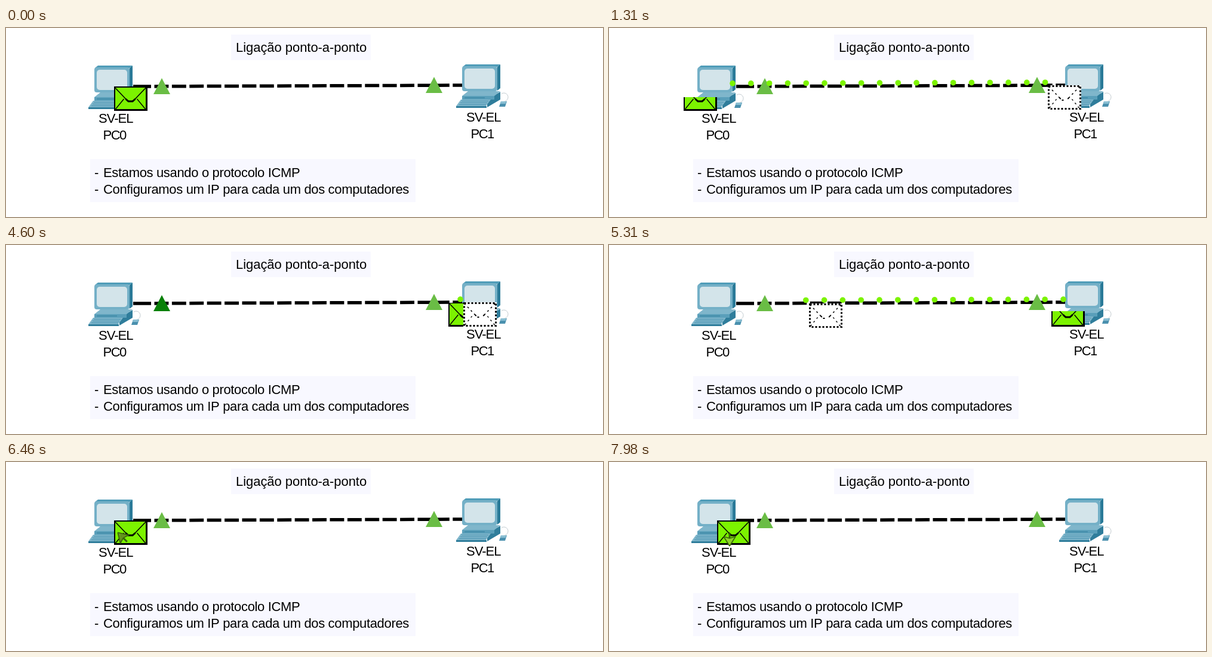
These frames come from a looping animation (1000 px wide and 317 px high, 8 s). An HTML page with a canvas:

```html
<!DOCTYPE html>
<html lang="pt">
<head>
<meta charset="utf-8">
<title>Ligação ponto-a-ponto</title>
<style>
  html, body { margin: 0; width: 100%; height: 100%; overflow: hidden; background: #fff; }
  canvas { display: block; width: 1000px; height: 317px; }
</style>
</head>
<body>
<canvas id="stage" width="1000" height="317"></canvas>
<script>
const ctx = document.getElementById('stage').getContext('2d');

const LOOP = 8000;
const GO = 500, BACK = 4600;     // start of each trip
const TICK = 67.2;               // screen refresh during a trip
const HOPS = 20, HOP = 30.8;     // hops between the computers and their length
const SPAN = HOPS * HOP;
const HOME = 181;                // envelope position at the left computer
const AWAY = HOME + SPAN;
const W = 56, H = 41;            // envelope size
const GREEN = '#7cf300', LIGHT = '#6abd45';

// everything on the right sits a little higher
const lift = x => 2 * (x - HOME) / SPAN;
const envTop = x => Math.round(98 - lift(x));
const hopsAt = (t, start) => Math.floor(1.61 + 1.424 * Math.floor((t - start) / TICK));

function at(x, y, paint) {
  ctx.save();
  ctx.translate(x, y);
  paint();
  ctx.restore();
}

function rect(x, y, w, h, fill) {
  ctx.fillStyle = fill;
  ctx.fillRect(x, y, w, h);
}

function disc(x, y, r, fill) {
  ctx.beginPath();
  ctx.arc(x, y, r, 0, Math.PI * 2);
  ctx.fillStyle = fill;
  ctx.fill();
}

function round(x, y, w, h, r, fill) {
  ctx.beginPath();
  ctx.roundRect(x, y, w, h, r);
  ctx.fillStyle = fill;
  ctx.fill();
}

// box whose top edge is shifted by dx, or whose right edge is shifted by dy
function slab(x, y, w, h, dx, dy, fill) {
  ctx.beginPath();
  ctx.moveTo(x + dx, y);
  ctx.lineTo(x + dx + w, y + dy);
  ctx.lineTo(x + w, y + h + dy);
  ctx.lineTo(x, y + h);
  ctx.fillStyle = fill;
  ctx.fill();
}

function line(x1, y1, x2, y2, width, color = '#000') {
  ctx.beginPath();
  ctx.moveTo(x1, y1);
  ctx.lineTo(x2, y2);
  ctx.strokeStyle = color;
  ctx.lineWidth = width;
  ctx.stroke();
}

function label(text, x, y, spacing = 0) {
  ctx.font = '22px "Liberation Sans", Arial, sans-serif';
  ctx.letterSpacing = spacing + 'px';
  ctx.fillStyle = '#000';
  ctx.fillText(text, x, y);
}

function bullet(text, y) {
  label('-', 148, y);
  label(text, 163, y, -0.34);
}

function computer(x, y, name) {
  at(x, y, () => {
    // system unit
    slab(52, 60, 22, 13, 0, -13, '#2f7d9b');
    slab(10, 46, 54, 8, 10, 0, '#7fb6cb');
    rect(10, 54, 54, 6, '#5a9fba');
    line(14, 57, 48, 57, 1, '#2f7d9b');
    // monitor
    slab(69, 5, 5, 40, 0, -4, '#2a7a98');
    slab(11, 1, 58, 4, 5, 0, '#4f9cb8');
    round(10, 4, 59, 42, 4, '#74b0c7');
    round(14, 8, 51, 34, 5, '#d3e4ea');
    // keyboard
    slab(0, 60, 50, 11, 8, 0, '#7fb6cb');
    rect(0, 71, 51, 3, '#2f7d9b');
    for (let i = 0; i < 3; i++) line(9 - 2 * i, 62.5 + 3 * i, 54 - 2 * i, 62.5 + 3 * i, 1, '#4a92b0');
    // mouse and its wire
    ctx.beginPath();
    ctx.arc(80, 56, 7, -2.2, 1.4);
    ctx.strokeStyle = '#c3ccd0';
    ctx.stroke();
    slab(72, 63, 10, 9, 3, 0, '#4a90ae');
    slab(74, 63, 9, 4, 1, 0, '#8abfd3');
  });
  label('SV-EL', x + 17, y + 97, -1);
  label(name, x + 24.5, y + 125, -1.5);
}

function light(x, y, fill) {
  ctx.beginPath();
  ctx.moveTo(x, y);
  ctx.lineTo(x + 14, y + 27);
  ctx.lineTo(x - 14, y + 27);
  ctx.fillStyle = fill;
  ctx.fill();
}

function cable() {
  line(213, 98, 243, 97.9, 5.5);
  ctx.setLineDash([23.9, 5.5]);
  line(248.5, 97.9, 767, 96, 5.5);
  ctx.setLineDash([]);
}

function folds(bold) {
  const mid = W / 2 - 0.5;
  for (const side of [-1, 1]) {
    const px = d => mid + side * d;
    line(px(26), 2, px(4), 25, 1.6);
    line(px(25), 38, px(11), 21, 1.4);
    line(px(8), 21, px(3), 25.5, bold);
  }
  line(mid - 4, 25, mid + 4, 25, bold);
}

// full envelope, visible between rows top and bottom
function envelope(x, top = 0, bottom = H) {
  at(Math.round(x), envTop(x), () => {
    ctx.beginPath();
    ctx.rect(0, top, W, bottom - top);
    ctx.clip();
    rect(0, 0, W, H, '#000');
    rect(2, 2, W - 5, H - 5, GREEN);
    folds(3);
  });
}

function ghost(x) {
  at(Math.round(x), envTop(x), () => {
    rect(0, 0, W, H, '#fff');
    ctx.setLineDash([3, 3]);
    ctx.strokeStyle = '#000';
    ctx.lineWidth = 3;
    ctx.strokeRect(1.5, 1.5, W - 3, H - 3);
    ctx.setLineDash([3, 5]);
    folds(2);
    ctx.setLineDash([]);
  });
}

// the envelope drains at one end, leaves a trail of dots and fills at the other
function trip(k, from, dir, firstDot) {
  const sent = Math.min(k, HOPS);
  const got = k - sent;
  const x = from + dir * HOP * sent;
  if (!got) envelope(from - W, k);
  ghost(x);
  if (got) envelope(x, H - got);
  for (let i = got; i < sent; i++) {
    const cx = firstDot + dir * HOP * i;
    disc(cx, 93 - lift(cx), 4.8, GREEN);
  }
}

// small arrow turning on the delivered envelope
function marker(p) {
  at(195 + 7 * p, 126 + 4 * p, () => {
    ctx.rotate(-Math.PI / 4 * (1 + 3 * p));
    line(0, 0, 0, 11, 3, '#37600a');
    for (const side of [-1, 1]) {
      ctx.beginPath();
      ctx.moveTo(0, -11);
      ctx.lineTo(side * 10, 5);
      ctx.lineTo(0, 2);
      ctx.fillStyle = `hsl(84, 65%, ${35 + 15 * p}%)`;
      ctx.fill();
      line(0, -11, side * 10, 5, 1.6, '#37600a');
      line(0, 2, side * 10, 5, 1.6, '#37600a');
    }
  });
}

function draw(t) {
  rect(0, 0, 1000, 317, '#fff');
  rect(377, 11, 234, 43, '#f8f8ff');
  rect(141, 220, 545, 72, '#f8f8ff');
  label('Ligação ponto-a-ponto', 385, 40, -0.05);
  bullet('Estamos usando o protocolo ICMP', 250);
  bullet('Configuramos um IP para cada um dos computadores', 278);

  const back = t >= BACK;
  const start = back ? BACK : GO;
  const k = t < GO ? 0 : hopsAt(t, start);
  const done = k >= 2 * HOPS;

  cable();
  computer(138, 62, 'PC0');
  computer(138 + SPAN, 60, 'PC1');
  light(261, 84, back && k === 1 ? '#078007' : LIGHT);
  light(717, 82, LIGHT);

  if (!k) envelope(HOME);
  else if (done) envelope(back ? HOME : AWAY);
  else if (back) trip(k, AWAY, -1, 761);
  else trip(k, HOME, 1, 207);

  if (back && done) marker(Math.max(0, (t - 6460) / 1520));
}

function frame() {
  draw(performance.now() % LOOP);
  requestAnimationFrame(frame);
}
frame();
</script>
</body>
</html>
```
